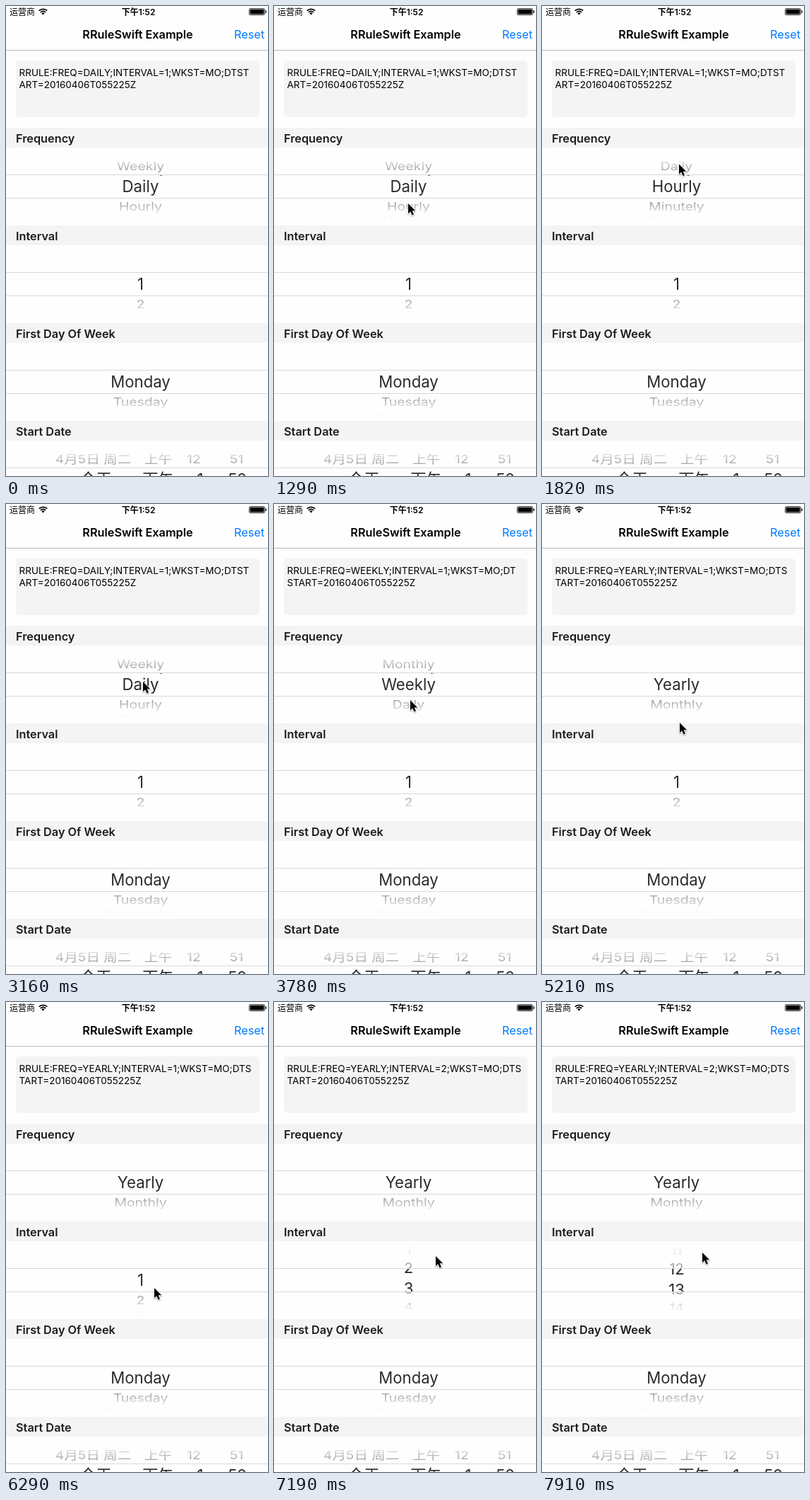
Animation of 371 by 664 pixels, one loop 8000 ms. Source, as an HTML page with a canvas:

```html
<!DOCTYPE html>
<html lang="en">
<head>
<meta charset="utf-8">
<title>Recurrence rule picker</title>
<style>
  html, body { margin: 0; width: 100%; height: 100%; overflow: hidden; background: #fefefe; }
  canvas { display: block; width: 371px; height: 664px; }
</style>
</head>
<body>
<canvas id="stage"></canvas>
<script>
const W = 371, H = 664, LOOP = 8000;
const BG = '#fefefe', PANEL = '#f4f4f4';
const FONT = 'Inter, "Noto Sans CJK SC", "Noto Sans CJK", sans-serif';

const canvas = document.getElementById('stage');
const ctx = canvas.getContext('2d');
const dpr = window.devicePixelRatio || 1;
canvas.width = W * dpr;
canvas.height = H * dpr;

// Screen updates come every 90 ms, restarting at these moments.
const TICKS = [500, 940, 1290, 1820, 1910, 3160, 3600, 5210];

// [time, x, y]
const CURSOR = [
  [500, 294, 256], [940, 190, 279], [1290, 190, 279], [1740, 194, 225], [1820, 194, 223.5],
  [1910, 197, 229], [2270, 198, 232], [2540, 195, 285], [2720, 195, 285], [3160, 194, 251],
  [3600, 194, 286], [4140, 190, 252], [4590, 190, 302], [4770, 195, 309], [5660, 195, 309],
  [6020, 212, 406], [6290, 210, 404], [6650, 212, 367], [7010, 212, 400],
  [7370, 246, 318], [7460, 262, 316], [7820, 227, 354]
];

// [time, row]
const FREQ_ROW = [
  [1290, 3], [1740, 4], [2270, 4], [2540, 3], [3160, 3], [3600, 2],
  [4230, 2], [4410, 1.77], [4590, 1], [4770, 0.4], [5040, 0]
];
const INTERVAL_ROW = [
  [6290, 0], [6740, 1], [7100, 1], [7190, 1.6], [7370, 4.8], [7730, 10.2], [7910, 11.55]
];

// [time, frequency]
const RULES = [[0, 'DAILY'], [1910, 'HOURLY'], [2630, 'DAILY'], [3690, 'WEEKLY'], [5210, 'YEARLY']];
const SECOND_INTERVAL = 6830;

const FREQS = ['Yearly', 'Monthly', 'Weekly', 'Daily', 'Hourly', 'Minutely', 'Secondly'];
const COUNTS = Array.from({ length: 40 }, (_, i) => String(i + 1));
const DAYS = ['Monday', 'Tuesday', 'Wednesday', 'Thursday', 'Friday', 'Saturday', 'Sunday'];

const linear = p => p;
const smooth = p => p * p * (3 - 2 * p);

function snap(t) {
  const start = TICKS.filter(s => s <= t).pop();
  return start === undefined ? 0 : start + Math.floor((t - start) / 90) * 90;
}

function sample(keys, t, ease = linear) {
  if (t <= keys[0][0]) return keys[0].slice(1);
  const i = keys.findIndex(k => k[0] > t);
  if (i < 0) return keys[keys.length - 1].slice(1);
  const a = keys[i - 1], b = keys[i];
  const p = ease((t - a[0]) / (b[0] - a[0]));
  return a.slice(1).map((v, j) => v + (b[j + 1] - v) * p);
}

function label(text, x, y, size, { weight = 400, color = '#000', align = 'left' } = {}) {
  ctx.font = `${weight} ${size}px ${FONT}`;
  ctx.fillStyle = color;
  ctx.textAlign = align;
  ctx.fillText(text, x, y);
}

function rect(x, y, w, h, color) {
  ctx.fillStyle = color;
  ctx.fillRect(x, y, w, h);
}

function clipped(x, y, w, h, draw) {
  ctx.save();
  ctx.beginPath();
  ctx.rect(x, y, w, h);
  ctx.clip();
  draw();
  ctx.restore();
}

const RADIUS = 50, ROW_ANGLE = 0.6065, BAND = 16.5, REACH = 48;

function eachRow(items, row, draw) {
  items.forEach((text, i) => {
    const angle = (i - row) * ROW_ANGLE;
    if (Math.abs(angle) < 1.3) draw(text, RADIUS * Math.sin(angle), Math.cos(angle));
  });
}

// A drum of grey rows, with a larger dark copy inside the middle band.
function wheel(cx, cy, items, row, shift = 0) {
  const drum = () => eachRow(items, row, (text, y, cos) => {
    ctx.save();
    ctx.translate(cx + shift, cy + y);
    ctx.scale(0.9 + 0.1 * cos, cos);
    label(text, 0, 7.2, 19.8, { color: '#8a8a8a', align: 'center' });
    ctx.restore();
  });
  clipped(0, cy - REACH, W, REACH - BAND, drum);
  clipped(0, cy + BAND, W, REACH - BAND, drum);
  clipped(0, cy - BAND, W, BAND * 2, () => eachRow(items, row, (text, y) =>
    label(text, cx, cy + y + 8.2, 22.2, { color: '#2b2b2b', align: 'center' })));
}

function fadeAndLines(cy) {
  for (const dir of [-1, 1]) {
    const g = ctx.createLinearGradient(0, cy + dir * BAND, 0, cy + dir * REACH);
    for (let p = 0; p <= 1; p += 0.25) {
      g.addColorStop(p, `rgba(254,254,254,${0.15 + 0.85 * smooth(p)})`);
    }
    rect(0, dir < 0 ? cy - 50 : cy + BAND, W, 50 - BAND, g);
    rect(0, Math.floor(cy + dir * BAND), W, 1, '#d9d9d9');
  }
}

function statusBar() {
  label('运营商', 5, 12.5, 12);
  label('下午1:52', 187.5, 12.5, 12, { weight: 600, align: 'center' });

  ctx.strokeStyle = ctx.fillStyle = '#000';
  ctx.lineWidth = 1.7;
  const from = -Math.PI * 0.75, to = -Math.PI * 0.25;
  for (const r of [8.2, 5.2]) {
    ctx.beginPath();
    ctx.arc(52.5, 12.5, r, from, to);
    ctx.stroke();
  }
  ctx.beginPath();
  ctx.moveTo(52.5, 12.5);
  ctx.arc(52.5, 12.5, 3, from, to);
  ctx.fill();

  ctx.lineWidth = 0.8;
  ctx.beginPath();
  ctx.roundRect(344.4, 3.6, 22, 9, 1.8);
  ctx.stroke();
  rect(345.5, 4.7, 19.8, 6.8, '#000');
  rect(367.4, 6.4, 1.3, 3.4, '#000');
}

function ruleBox(t) {
  ctx.fillStyle = PANEL;
  ctx.beginPath();
  ctx.roundRect(14, 77, 345, 80, 5);
  ctx.fill();
  const freq = RULES.filter(r => r[0] <= t).pop()[1];
  const count = t < SECOND_INTERVAL ? 1 : 2;
  const rule = `RRULE:FREQ=${freq};INTERVAL=${count};WKST=MO;DTSTART=20160406T055225Z`;
  // Wider words leave room for one letter less.
  const cut = /HOUR|WEEK/.test(freq) ? 39 : 40;
  label(rule.slice(0, cut), 18.5, 98.7, 13.5);
  label(rule.slice(cut), 18.5, 115.7, 13.5);
}

const ARROW = new Path2D('M0 0V14.2L3.2 11.2L5.6 16.4L8 15.4L5.7 10.3H10.2Z');

function cursor(t) {
  if (t < CURSOR[0][0]) return;
  const [x, y] = sample(CURSOR, t, smooth);
  ctx.save();
  ctx.translate(x, y);
  ctx.lineJoin = 'round';
  ctx.lineWidth = 1.8;
  ctx.strokeStyle = '#fff';
  ctx.shadowColor = 'rgba(0,0,0,0.35)';
  ctx.shadowBlur = 2 * dpr;
  ctx.shadowOffsetY = dpr;
  ctx.stroke(ARROW);
  ctx.shadowColor = 'transparent';
  ctx.fillStyle = '#000';
  ctx.fill(ARROW);
  ctx.restore();
}

function draw(t) {
  ctx.setTransform(dpr, 0, 0, dpr, 0, 0);
  rect(0, 0, W, H, BG);

  statusBar();
  label('RRuleSwift Example', 186.5, 46.3, 16.3, { weight: 600, align: 'center' });
  label('Reset', 366, 46.3, 16.2, { color: '#007aff', align: 'right' });
  rect(0, 62, W, 1, '#b9b9b9');
  ruleBox(t);

  wheel(190.5, 255, FREQS, sample(FREQ_ROW, t)[0]);
  wheel(190.5, 393, COUNTS, sample(INTERVAL_ROW, t)[0]);
  wheel(190.5, 531, DAYS, 0);
  wheel(127.5, 668.5, ['4月5日 周二', '今天'], 1, -4);
  wheel(215.5, 668.5, ['上午', '下午'], 1);
  wheel(275, 668.5, ['12', '1'], 1, -9);
  wheel(327.5, 668.5, ['51', '52'], 1, -1);

  ['Frequency', 'Interval', 'First Day Of Week', 'Start Date'].forEach((name, i) => {
    const y = 172 + i * 138;
    fadeAndLines(y + 83);
    rect(0, y, W, 28, PANEL);
    label(name, 14, y + 20.5, 16.3, { weight: 600, color: '#1c1c1c' });
  });

  cursor(t);
}

function frame() {
  draw(snap(performance.now() % LOOP));
  requestAnimationFrame(frame);
}
frame();
</script>
</body>
</html>
```
